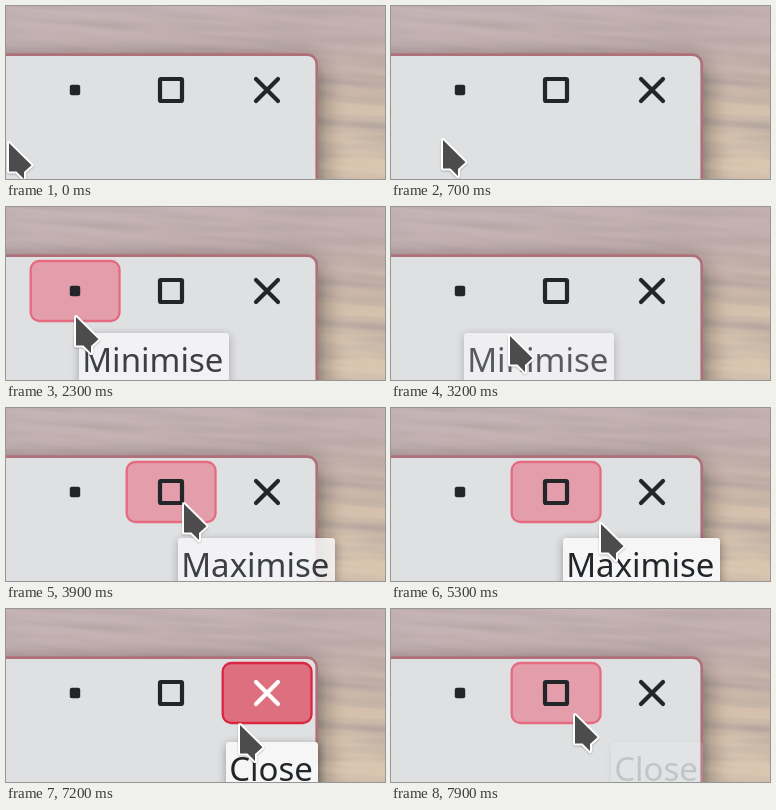
Animation of 379 by 173 pixels, one loop 8 s. Source, as an HTML page:

```html
<!DOCTYPE html>
<html lang="en">
<head>
<meta charset="utf-8">
<title>Window buttons</title>
<style>
  html, body { margin: 0; width: 100%; height: 100%; overflow: hidden; background: #c8b8b8; }
  svg { display: block; width: 379px; height: 173px; }
  text { font: 33px "Noto Sans", "Open Sans", sans-serif; fill: #232629; }
  .button { fill: #e39dab; stroke: #e56b80; stroke-width: 2.3; }
  .danger { fill: #de6f7e; stroke: #db2640; }
  .icon { fill: none; stroke: #232629; stroke-width: 4.2; }
</style>
</head>
<body>
<svg viewBox="0 0 379 173" xmlns="http://www.w3.org/2000/svg">
  <defs>
    <linearGradient id="sky" x2=".25" y2="1">
      <stop offset="0" stop-color="#c6b4b8"/>
      <stop offset=".4" stop-color="#c4b0b0"/>
      <stop offset=".75" stop-color="#d3bfac"/>
      <stop offset="1" stop-color="#dac6b0"/>
    </linearGradient>
    <filter id="streaks" x="0" y="0" width="100%" height="100%">
      <feTurbulence type="fractalNoise" baseFrequency=".006 .07" numOctaves="3" seed="4"/>
      <feColorMatrix values="0 0 0 0 .42  0 0 0 0 .35  0 0 0 0 .33  1.6 0 0 0 -.6"/>
    </filter>
    <filter id="soft" x="-30%" y="-30%" width="160%" height="160%"><feGaussianBlur stdDeviation="13"/></filter>
    <filter id="tipShadow" x="-20%" y="-40%" width="140%" height="180%"><feGaussianBlur stdDeviation="5"/></filter>
    <filter id="pointerShadow" x="-30%" y="-30%" width="160%" height="160%"><feGaussianBlur stdDeviation="1.2"/></filter>
    <path id="arrow" d="M2 3V31.5H9.5L17 39V32L24.5 25.2Z" stroke-linejoin="round"/>
  </defs>

  <rect width="379" height="173" fill="url(#sky)"/>
  <rect x="-20" y="-20" width="440" height="230" filter="url(#streaks)" transform="rotate(4 190 86)"/>

  <rect x="-60" y="56" width="373" height="200" rx="10" fill="#1c1612" opacity=".58" filter="url(#soft)"/>
  <rect x="-30" y="48.6" width="340.7" height="200" rx="9.5" fill="#dee0e2" stroke="#b0707a" stroke-width="2.6"/>

  <g id="hovers"></g>
  <rect x="63.8" y="78.8" width="10.4" height="10.4" rx="2" fill="#232629"/>
  <rect class="icon" x="154" y="73" width="22" height="22" rx="1"/>
  <path id="cross" class="icon" d="M250 73l22 22m0-22l-22 22" stroke-linecap="round"/>
  <g id="tips"></g>

  <g id="pointer">
    <use href="#arrow" y="1" opacity=".35" stroke="#000" stroke-width="3" filter="url(#pointerShadow)"/>
    <use href="#arrow" fill="#fff" stroke="#fff" stroke-width="4"/>
    <use href="#arrow" fill="#4c4c4c"/>
  </g>
</svg>

<script>
const LOOP = 8000, TICK = 100;
const $ = id => document.getElementById(id);
const clamp = v => Math.max(0, Math.min(1, v));
const easeOut = k => 1 - (1 - k) ** 1.5;

// Pointer glides between rests.
const rest = { x: 1, y: 134 };
const glides = [
  { from: 0, to: 200, x: 19, y: 137 },
  { from: 300, to: 900, x: 57, y: 129 },
  { from: 1000, to: 1600, x: 68, y: 107 },
  { from: 2700, to: 3000, x: 97, y: 127 },
  { from: 3100, to: 3500, x: 155, y: 125 },
  { from: 3600, to: 3900, x: 176, y: 93 },
  { from: 4600, to: 5000, x: 196, y: 126 },
  { from: 5100, to: 5300, x: 208, y: 113 },
  { from: 5300, to: 5500, x: 228, y: 113 },
  { from: 5900, to: 6000, x: 263, y: 130 },
  { from: 7100, to: 7200, x: 232, y: 113 },
  { from: 7200, to: 7500, x: 182, y: 103 }
];

const buttons = [
  { hover: [{ on: 1300, off: 2700 }],
    tip: { label: "Minimise", x: 73, y: 126, w: 150, on: 2000, off: 3100 } },
  { hover: [{ on: 3600, off: 5300 }, { on: 7200, off: LOOP }],
    tip: { label: "Maximise", x: 172, y: 130, w: 157, on: 3600, off: 5300, fall: 200 } },
  { hover: [{ on: 5300, off: 7200 }], danger: true,
    tip: { label: "Close", x: 220, y: 133, w: 92, on: 5300, off: 7600, rise: 200 } }
];

function level(t, { on, off, rise = 350, fall = 350 }) {
  return clamp((t - on) / rise) * (1 - clamp((t - off) / fall));
}

function hoverLevel(t, { hover }) {
  return Math.max(...hover.map(span => level(t, { ...span, rise: 200, fall: 200 })));
}

function pointerAt(t) {
  let { x, y } = rest;
  for (const g of glides) {
    const k = easeOut(clamp((t - g.from) / (g.to - g.from)));
    x += (g.x - x) * k;
    y += (g.y - y) * k;
  }
  return [Math.round(x), Math.round(y)];
}

function add(parent, name, attrs = {}) {
  const el = document.createElementNS("http://www.w3.org/2000/svg", name);
  for (const key in attrs) el.setAttribute(key, attrs[key]);
  return parent.appendChild(el);
}

buttons.forEach((button, i) => {
  button.glow = add($("hovers"), "rect", {
    class: button.danger ? "button danger" : "button",
    x: 24.7 + 96 * i, y: 54, width: 88.8, height: 60, rx: 8.5
  });
  const { label, x, y, w: width } = button.tip;
  const box = { x, y, width, height: 53, rx: 3 };
  button.bubble = add($("tips"), "g");
  add(button.bubble, "rect", { ...box, y: y + 2, opacity: .32, filter: "url(#tipShadow)" });
  add(button.bubble, "rect", { ...box, fill: "#f6f6f7" });
  add(button.bubble, "text", { x: x + 3.2, y: y + 39 }).textContent = label;
});

function draw(ms) {
  const t = Math.floor((ms % LOOP) / TICK) * TICK;
  $("pointer").setAttribute("transform", `translate(${pointerAt(t)})`);
  for (const button of buttons) {
    button.glow.style.opacity = hoverLevel(t, button);
    button.bubble.style.opacity = level(t, button.tip);
  }
  const lit = hoverLevel(t, buttons[2]);
  $("cross").style.stroke = `rgb(${[35, 38, 41].map(c => Math.round(c + (255 - c) * lit))})`;
}

const start = performance.now();
function loop() {
  draw(performance.now() - start);
  requestAnimationFrame(loop);
}
loop();
</script>
</body>
</html>
```
